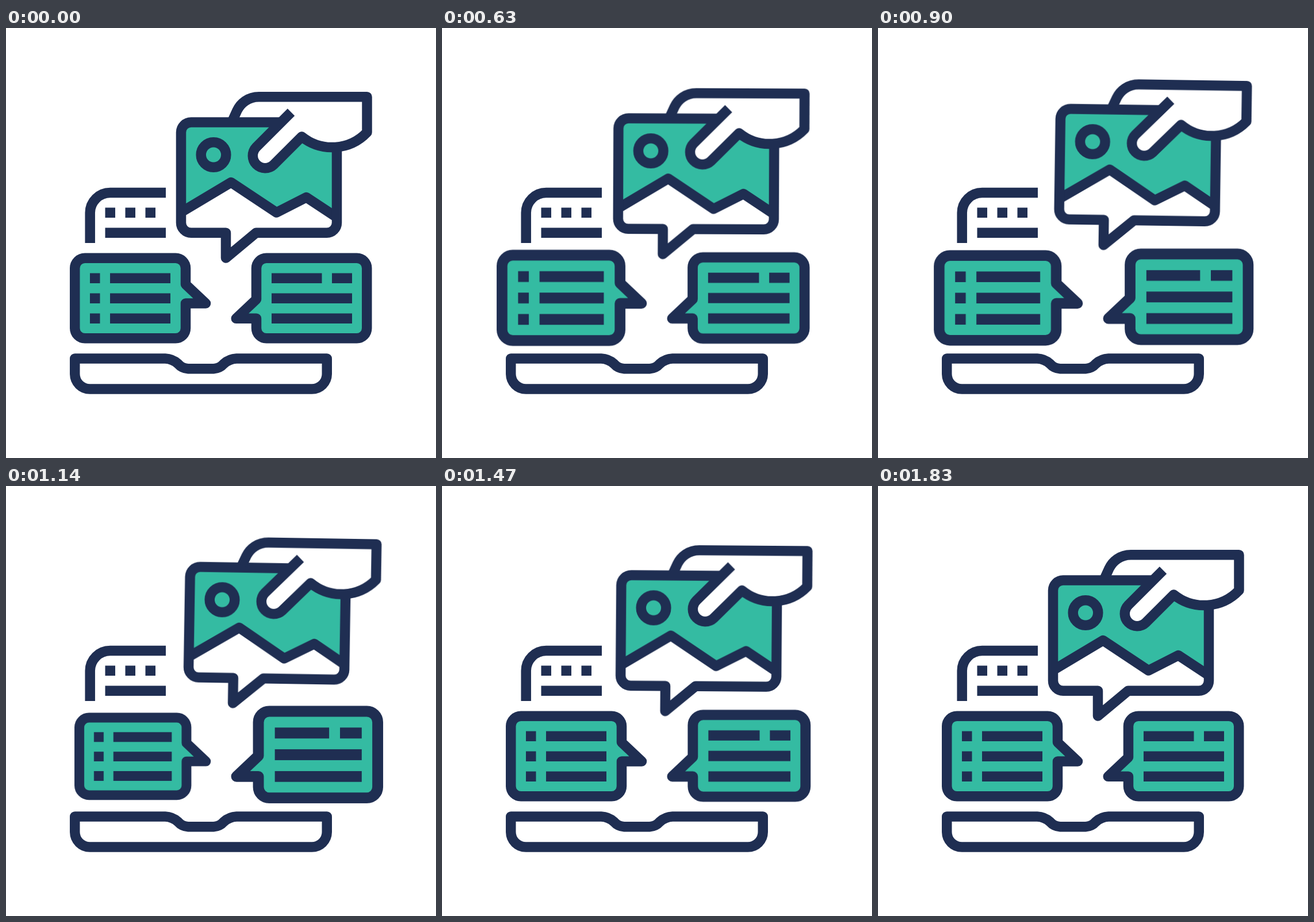
An HTML page that plays this animation: 748x748 px, repeating every 2.16 s.

```html
<!DOCTYPE html>
<html lang="en">
<head>
<meta charset="utf-8">
<title>Sharing messages</title>
<style>
  html, body { margin: 0; height: 100%; overflow: hidden; background: #fff; }
  svg { display: block; width: 100%; height: 100%; }

  .line { fill: none; stroke: #1f2e52; stroke-width: 17.5; stroke-linejoin: round; }
  .bubble { fill: #34bba2; }
  .green { fill: #34bba2; }
  .white { fill: #fff; }
  .ink { fill: #1f2e52; }

  .left, .right, .slide, .lift, .tilt {
    animation: 2160ms cubic-bezier(.37, 0, .63, 1) infinite;
  }
  .left  { animation-name: pulse-left;  transform-origin: 356px 479px; }
  .right { animation-name: pulse-right; transform-origin: 391.5px 505px; }
  .slide { animation-name: slide; }
  .lift  { animation-name: lift; }
  .tilt  { animation-name: tilt; transform-origin: 361px 220.5px; }

  @keyframes pulse-left {
    0%, 9.72%   { transform: scale(1); }
    37.04%      { transform: scale(1.08); }
    52.5%       { transform: scale(.967); }
    67.6%, 100% { transform: scale(1); }
  }
  @keyframes pulse-right {
    0%, 22.45%  { transform: scale(1); }
    49.17%      { transform: scale(1.083); }
    77.1%, 100% { transform: scale(1); }
  }
  @keyframes slide {
    0%, 22.22%   { transform: translateX(0); }
    49.77%       { transform: translateX(15.3px); }
    84.72%, 100% { transform: translateX(0); }
  }
  @keyframes lift {
    0%, 19.91%   { transform: translateY(0); }
    46.3%        { transform: translateY(-24.5px); }
    82.87%, 100% { transform: translateY(0); }
  }
  @keyframes tilt {
    0%, 19.44%   { transform: rotate(0deg); }
    49.07%       { transform: rotate(.95deg); }
    84.72%, 100% { transform: rotate(0deg); }
  }
</style>
</head>
<body>
<svg viewBox="0 0 748 748">
  <!-- laptop -->
  <path class="line" d="M119.75 575H277A35 35 0 0 1 299 584A26 26 0 0 0 317 592.75H361A26 26 0 0 0 379 584A35 35 0 0 1 401 575H558.25V602A26.2 26.2 0 0 1 532 628H146A26.2 26.2 0 0 1 119.75 602Z"/>
  <path class="line" d="M146.2 374V321.3A35 35 0 0 1 181.2 286.5H278"/>
  <path class="ink" d="M172.5 312.5h17.5v17.5h-17.5zM207.5 312.5h17.5v17.5h-17.5zM242.5 312.5h17.5v17.5h-17.5zM172.5 347.5H278v17.5H172.5z"/>

  <!-- left message -->
  <g class="left">
    <path class="line bubble" d="M137.25 400.25H295A17.5 17.5 0 0 1 312.5 417.75V446L347.5 479H312.5V522.25A17.5 17.5 0 0 1 295 539.75H137.25A17.5 17.5 0 0 1 119.75 522.25V417.75A17.5 17.5 0 0 1 137.25 400.25Z"/>
    <path class="ink" d="M146 426.5h17.5v17.5h-17.5zM146 461.5h17.5v17.5h-17.5zM146 496.5h17.5v17.5h-17.5zM181 426.5h105v17.5h-105zM181 461.5h105v17.5h-105zM181 496.5h105v17.5h-105z"/>
  </g>

  <!-- right message -->
  <g class="right">
    <path class="line bubble" d="M453 400.25H610.25A17.5 17.5 0 0 1 627.75 417.75V522.25A17.5 17.5 0 0 1 610.25 539.75H453A17.5 17.5 0 0 1 435.5 522.25V505.25H400.25L435.5 472V417.75A17.5 17.5 0 0 1 453 400.25Z"/>
    <path class="ink" d="M462 426.5h87.5v17.5h-87.5zM567 426.5h35v17.5h-35zM462 461.5h140v17.5h-140zM462 496.5h140v17.5h-140z"/>
  </g>

  <!-- hand with picture -->
  <g class="slide"><g class="lift"><g class="tilt">
    <path class="green" d="M304.5 320.5V181.5A17.5 17.5 0 0 1 322 164H575.5V329.5L522.5 294.5L470.5 321L391.5 268.5Z"/>
    <path class="white" d="M394.5 160L402 143.5C408 131 421 119.75 440 119.75H628V181.5A84 84 0 0 1 514.5 189L465.7 237.7A21.5 21.5 0 0 1 435.3 207.3L496 146.5Z"/>
    <path class="line" d="M304.5 320.5L391.5 268.5L470.5 321L522.5 294.5L575.5 329.5"/>
    <circle class="line" cx="361" cy="220.5" r="21.8"/>
    <path class="line" d="M575.5 205V338.75A17.5 17.5 0 0 1 558 356.25H435L382.5 400V356.25H322A17.5 17.5 0 0 1 304.5 338.75V181.5A17.5 17.5 0 0 1 322 164H476"/>
    <path class="line" d="M394.5 160L402 143.5C408 131 421 119.75 440 119.75H628V181.5A84 84 0 0 1 514.5 189L465.7 237.7A21.5 21.5 0 0 1 435.3 207.3L496 146.5"/>
  </g></g></g>
</svg>
</body>
</html>
```
